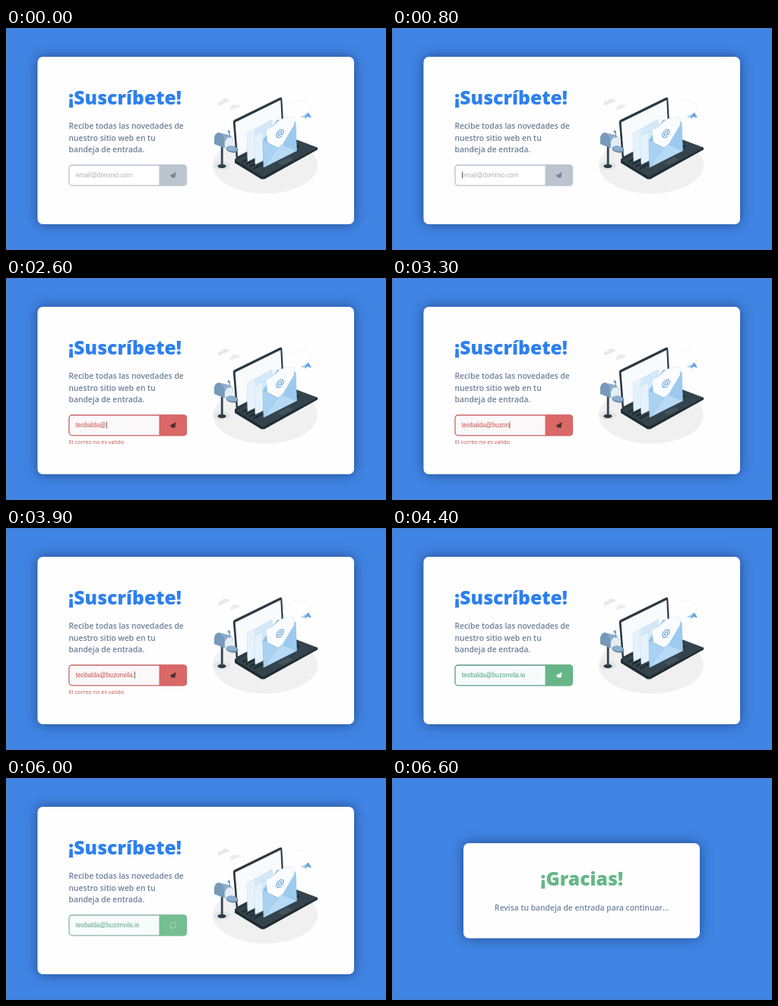
Write an HTML page with a canvas that moves like this. It is 500x293 px and loops after 8200 ms.

```html
<!DOCTYPE html>
<html lang="es">
<head>
<meta charset="utf-8">
<title>Suscripción</title>
<style>
html, body { margin: 0; width: 100%; height: 100%; overflow: hidden; background: #4084e4; }
canvas { display: block; width: 500px; height: 293px; }
</style>
</head>
<body>
<canvas id="stage"></canvas>
<script>
const W = 500, H = 293, LOOP = 8200;
const canvas = document.getElementById('stage');
const ctx = canvas.getContext('2d');
const ratio = window.devicePixelRatio || 1;
canvas.width = W * ratio;
canvas.height = H * ratio;
ctx.scale(ratio, ratio);

const SANS = '"Open Sans", sans-serif';
const TITLE_FONT = '800 24.7px ' + SANS;
const BODY_FONT = '600 10.3px ' + SANS;
const INPUT_FONT = '8.25px "Liberation Sans", Arial, sans-serif';
const EMAIL = 'teobalda@buzonvila.io';
const FOCUS = 400, SENDING = 5500, DONE = 6500;

const THEMES = {
  idle: { line: '#b5c0cf', button: '#bcc5cf', icon: '#75818e', text: '#a9b2bd', fill: '#fff' },
  error: { line: '#c96467', button: '#d96867', icon: '#45292c', text: '#c84d4d', fill: '#fbf8f9' },
  valid: { line: '#5c9c85', button: '#66b688', icon: '#fff', text: '#48a37a', fill: '#f8fbfb' },
  sending: { line: '#87b5a9', button: '#74be91', icon: '#fff', text: '#57a582', fill: '#f8fbfb' }
};

// Typing comes in two bursts: the user part, then the domain.
const keyTime = i =>
  i < 8 ? 850 + i * 150 :
  i === 8 ? 2350 :
  2700 + (i - 9) * 125;

function typedCount(t) {
  let n = 0;
  while (n < EMAIL.length && keyTime(n) <= t) n++;
  return n;
}

function paint(fill, stroke, width = 0.5) {
  if (fill) { ctx.fillStyle = fill; ctx.fill(); }
  if (stroke) { ctx.strokeStyle = stroke; ctx.lineWidth = width; ctx.stroke(); }
}

function poly(points, fill, stroke, width) {
  ctx.beginPath();
  points.forEach(([x, y]) => ctx.lineTo(x, y));
  ctx.closePath();
  paint(fill, stroke, width);
}

function oval(x, y, rx, ry, fill, angle = 0) {
  ctx.beginPath();
  ctx.ellipse(x, y, rx, ry, angle, 0, Math.PI * 2);
  paint(fill);
}

function box(x, y, w, h, radius, fill, stroke, width) {
  ctx.beginPath();
  ctx.roundRect(x, y, w, h, radius);
  paint(fill, stroke, width);
}

function shape(d, fill, stroke, width) {
  const p = new Path2D(d);
  if (fill) { ctx.fillStyle = fill; ctx.fill(p); }
  if (stroke) { ctx.strokeStyle = stroke; ctx.lineWidth = width; ctx.stroke(p); }
}

function write(text, x, y, font, color, align = 'left') {
  ctx.font = font;
  ctx.fillStyle = color;
  ctx.textAlign = align;
  ctx.fillText(text, x, y);
}

function card(x, y, w, h) {
  ctx.save();
  ctx.shadowColor = 'rgba(15, 35, 75, .58)';
  ctx.shadowBlur = 16 * ratio;
  box(x, y, w, h, 7, '#fefefe');
  ctx.restore();
}

function background() {
  ctx.fillStyle = '#4084e4';
  ctx.fillRect(0, 0, W, H);
  ctx.strokeStyle = 'rgba(95, 125, 165, .5)';
  ctx.lineWidth = 1;
  ctx.strokeRect(0.5, 0.5, W - 1, H - 1);
}

function clouds() {
  shape('M279 103 L279 99 Q281 95 284 97 Q286 91 290 94 Q293 93 294 96 L297 95 Z', '#e8e8e8');
  shape('M294 109 L296 104 Q299 99 302 102 Q306 100 308 104 Z', '#ebebeb');
}

function mailbox() {
  oval(284, 181.5, 11, 5.5, '#e1e5e8');
  oval(284, 182.3, 5.5, 2.6, '#2b3a43');
  ctx.fillStyle = '#34444f';
  ctx.fillRect(282.8, 156, 2.8, 26);
  shape('M274 153 V145 Q275 139 280 138 L293 141 Q299 143 299 150 V155 L288 158.5 Z', '#8caecd');
  shape('M274 153 V145 Q275 139 280 138 Q287 141 287 148 V158 Z', '#7799ba');
  shape('M288 158 V151 Q290 144 295 143.5 Q299 145 299 151 V156 Z', '#e5edf4');
  oval(297.5, 160, 8, 4.4, '#5f7f9f', 0.15);
  oval(297.2, 159.2, 7.2, 3.6, '#8caecd', 0.15);
  poly([[295, 145], [295, 136], [291.8, 134.5], [291.8, 138], [293.8, 139], [293.8, 145]], '#6f9dca');
}

function keyboard() {
  ctx.setLineDash([2.4, 0.8]);
  for (let row = 0; row < 4; row++) {
    ctx.beginPath();
    ctx.moveTo(311 + row * 5, 177 + row * 2.8);
    ctx.lineTo(371 + row * 5, 147 + row * 2.8);
    paint(null, '#182329', 2.2);
  }
  ctx.setLineDash([]);
  poly([[357, 178], [371, 170.5], [378, 173.5], [364, 181]], '#45535b');
}

function laptop() {
  poly([[301, 173], [366, 142], [410, 158], [410, 160.5], [340, 199.5], [336, 199.5], [301, 178]], '#202c33');
  poly([[301, 174], [366, 141], [410, 158], [338, 196.5]], '#34434c');
  keyboard();
  shape('M298.8 124 Q298.8 122 301 121 L360 92 Q363 90.5 363.3 94 L366 142 L303 175 Z', '#2a3942');
  poly([[301.6, 124.5], [361.3, 95], [363.5, 139], [305, 169.5]], '#f8fafc');
}

function sheet(x, y) {
  poly([[x, y], [x + 33, y - 18], [x + 35, y + 20], [x + 1, y + 37]], '#d3e8f8', '#b4d5ee');
  poly([[x, y], [x + 10, y - 5], [x + 11, y + 32], [x + 1, y + 37]], '#e5f2fc');
}

function envelope() {
  sheet(317, 139);
  sheet(327, 143);
  poly([[338, 148], [357, 121], [381, 124], [382.5, 162], [339, 184]], '#8fc0e8');
  shape('M342 134 Q350 132 356 125 Q365 116 379 118 L380 145 L360 159 L344 151 Z', '#fafcff', '#c6ddf0', 0.5);
  ctx.save();
  ctx.translate(360.5, 140);
  ctx.transform(1, -0.35, 0, 1, 0, 0);
  ctx.textBaseline = 'middle';
  write('@', 0, 0, '600 13px ' + SANS, '#5d9edb', 'center');
  ctx.restore();
  poly([[338, 148], [359, 160], [339, 184]], '#a9d2f2', '#8ebfe5');
  poly([[381, 125], [382.5, 162], [362, 157]], '#9ccaef', '#8ebfe5');
  poly([[339, 184], [358, 158], [363, 154], [382.5, 162]], '#b7daf5', '#8ebfe5');
}

function flyingPlane() {
  ctx.setLineDash([1.5, 1.7]);
  shape('M371 101 C380 94 394 93 399 101 Q403 108 398 113', null, '#cbd9e6', 0.6);
  ctx.setLineDash([]);
  poly([[388, 118], [398, 111.5], [402, 118.5], [396, 117], [394, 120], [393, 117.5]], '#64a4df');
  poly([[388, 118], [398, 111.5], [393, 117.5]], '#b2d4f1');
}

function illustration() {
  oval(341, 181, 69, 37.5, '#f0f0f1');
  clouds();
  flyingPlane();
  laptop();
  envelope();
  mailbox();
}

function sendIcon(color) {
  poly([[215.3, 195], [223.6, 190.2], [222.2, 198], [219.6, 196.9], [218.1, 198.7], [218, 196.2]], color);
  ctx.beginPath();
  ctx.moveTo(218.2, 196.3);
  ctx.lineTo(222.2, 192);
  paint(null, 'rgba(255, 255, 255, .3)', 0.5);
}

function spinner(t) {
  const turn = Math.floor((t - SENDING) / 125) % 8;
  for (let i = 0; i < 8; i++) {
    const a = (i + turn) * Math.PI / 4;
    ctx.globalAlpha = 0.45 + i * 0.07;
    oval(219.5 + Math.cos(a) * 3.8, 194.5 + Math.sin(a) * 3.8, 0.75, 0.75, '#fff');
  }
  ctx.globalAlpha = 1;
}

function field(t) {
  const count = typedCount(t);
  const complete = count === EMAIL.length;
  const state = t >= SENDING ? 'sending' : complete ? 'valid' : count ? 'error' : 'idle';
  const theme = THEMES[state];

  box(83, 181, 154.5, 26.8, 4, theme.fill);
  box(83, 181, 154.5, 26.8, 4, null, theme.line, 1.3);
  box(201.5, 180.5, 36.5, 27.8, [0, 4, 4, 0], theme.button);

  const typed = EMAIL.slice(0, count);
  write(typed || 'email@dominio.com', 91.7, 197, INPUT_FONT, theme.text);
  if (t >= FOCUS && !complete) {
    const x = 92 + ctx.measureText(typed).width;
    ctx.fillStyle = '#554047';
    ctx.fillRect(x, 189.5, 0.8, 9);
  }
  if (state === 'error') {
    write('El correo no es valido', 82.7, 219, '7.3px ' + SANS, '#c44f50');
  }
  if (state === 'sending') spinner(t);
  else sendIcon(theme.icon);
}

function signup(t) {
  card(41.5, 38, 416.5, 221);
  write('¡Suscríbete!', 82, 101, TITLE_FONT, '#2e80ee');
  ['Recibe todas las novedades de', 'nuestro sitio web en tu', 'bandeja de entrada.']
    .forEach((line, i) => write(line, 82.5, 133 + i * 15.5, BODY_FONT, '#6d8197'));
  field(t);
  illustration();
}

function thanks() {
  card(94, 86, 311, 125.5);
  write('¡Gracias!', 249.7, 142, TITLE_FONT, '#66b688', 'center');
  write('Revisa tu bandeja de entrada para continuar...', 249.7, 174.7, BODY_FONT, '#71869b', 'center');
}

function draw(now) {
  const t = now % LOOP;
  background();
  if (t < DONE) signup(t);
  else thanks();
  requestAnimationFrame(draw);
}

requestAnimationFrame(draw);
</script>
</body>
</html>
```
